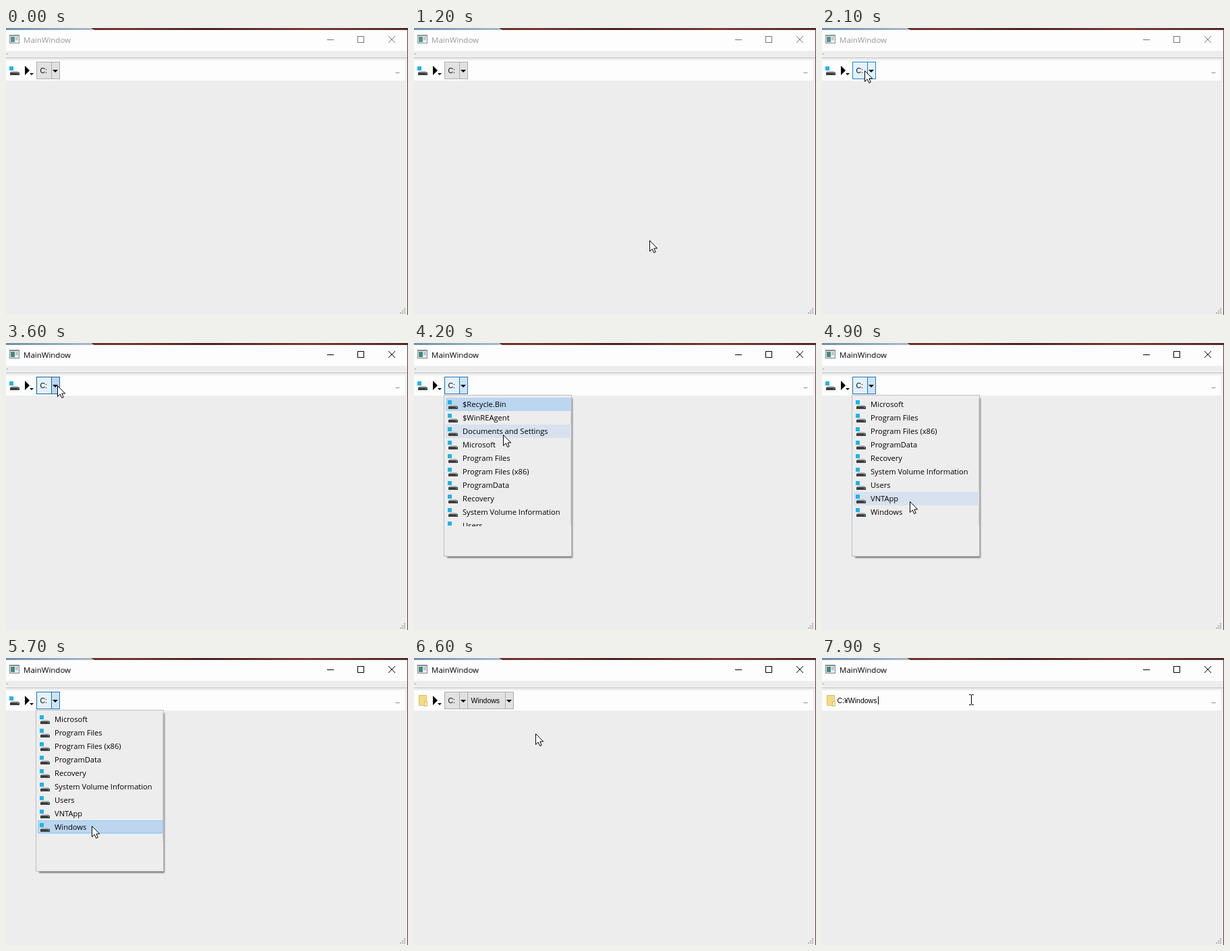
Recreate the animation shown at these times as an HTML page. Size 596 by 426 pixels, loop 8000 ms.

```html
<!DOCTYPE html>
<html lang="en">
<head>
<meta charset="utf-8">
<title>MainWindow</title>
<style>
  html, body { margin: 0; width: 100%; height: 100%; overflow: hidden; background: #ededed; }
  svg { display: block; width: 596px; height: 426px; }
  rect, .crisp { shape-rendering: crispEdges; }
  .ui { font: 11.15px "Open Sans", sans-serif; }
  .title { font-size: 11.5px; }
  .bar { font: 10.5px "Liberation Sans", Arial, sans-serif; }
</style>
</head>
<body>
<svg viewBox="0 0 596 426" xmlns="http://www.w3.org/2000/svg">
  <defs>
    <linearGradient id="sky"><stop stop-color="#6f8eaa"/><stop offset="1" stop-color="#a9bccb"/></linearGradient>
    <linearGradient id="rock">
      <stop stop-color="#4a2523"/><stop offset=".3" stop-color="#75392f"/><stop offset=".5" stop-color="#4c2424"/>
      <stop offset=".75" stop-color="#7a3c34"/><stop offset="1" stop-color="#51292a"/>
    </linearGradient>
    <filter id="soft" x="-5%" y="-5%" width="110%" height="110%"><feGaussianBlur stdDeviation="1"/></filter>
    <clipPath id="view"><rect x="47" y="81" width="187" height="191"/></clipPath>
    <g id="drive">
      <rect x="0" y="0" width="6" height="6" fill="#1db4ea"/>
      <path d="M3 7H13L15 10H1Z" fill="#b4b6b8"/>
      <rect x="1" y="9" width="14" height="4" fill="#3c3f42"/>
      <rect x="12" y="10" width="2" height="1" fill="#4fd06a"/>
    </g>
    <path id="down" d="M0 0H8L4 4Z"/>
    <g id="grip" fill="#b4b4b4"></g>
  </defs>

  <rect width="596" height="426" fill="#ededed"/>
  <rect width="596" height="3" fill="url(#rock)"/>
  <path d="M0 0H126L131 3H0Z" fill="url(#sky)"/>
  <rect y="3" width="595" height="31" fill="#fdfdfd"/>
  <rect x="595" y="3" width="1" height="423" fill="#5b3a38"/>

  <g id="appIcon">
    <rect x="5" y="10" width="15" height="13" fill="#85898d"/>
    <rect x="6" y="12" width="13" height="10" fill="#e9ecee"/>
    <rect x="7" y="13" width="6" height="8" fill="#3f8a80"/>
    <rect x="14" y="13" width="4" height="5" fill="#b9c6cf"/>
  </g>
  <g id="caption">
    <text class="ui title" x="26" y="22">MainWindow</text>
    <g fill="none" stroke="currentColor">
      <path class="crisp" d="M476 17.5H486M521.5 12.5H530.5V21.5H521.5Z"/>
      <path d="M567 12L577 22M577 12L567 22"/>
    </g>
  </g>

  <rect x="1" y="38" width="2" height="1" fill="#9a9a9a"/>
  <rect y="44" width="595" height="1" fill="#bcbcbc"/>
  <rect y="45" width="595" height="1" fill="#f8f8f8"/>
  <rect y="48" width="592" height="30" fill="#fdfdfd"/>
  <path class="crisp" d="M578 66.5h1m1 0h1m1 0h1" stroke="#222"/>

  <use id="driveIcon" href="#drive" x="5" y="57"/>
  <g id="folder">
    <rect x="7" y="55" width="11" height="15" fill="#f3dc86" stroke="#d3b458" stroke-width=".8"/>
    <rect x="15" y="64" width="4" height="7" fill="#f8e9a9" stroke="#d3b458" stroke-width=".8"/>
  </g>
  <g id="crumbs">
    <path d="M28 56L35 63L28 70Z"/>
    <use href="#down" transform="translate(35 67) scale(.75)"/>
    <g id="windowsCrumb"></g>
    <g id="rootCrumb"></g>
  </g>
  <g id="editor">
    <text class="bar" x="22.5" y="67">C:¥Windows</text>
    <rect id="caret" x="83" y="57" width="1" height="12"/>
  </g>

  <g id="menu">
    <rect x="49" y="82" width="186" height="237" fill="#555" opacity=".75" filter="url(#soft)"/>
    <rect class="crisp" x="44.5" y="77.5" width="189" height="239" fill="#ededed" stroke="#bdbdbd"/>
    <rect x="232" y="82" width="1" height="190" fill="#d2d2d2"/>
    <g clip-path="url(#view)">
      <rect id="hover" x="47" width="186" height="20" fill="#d8e1ef"/>
      <rect id="chosen" x="47" width="186" height="20" fill="#bcd6f0"/>
      <rect id="focus" x="47.5" y="241.5" width="185" height="18" fill="none" stroke="#94c9f7"/>
      <g id="items"></g>
    </g>
  </g>

  <g id="sizeGrip" fill="#b2b2b2"></g>

  <path id="arrow" d="M.5 .5V16.5L4.2 13L6.7 18.5L9.2 17.4L6.8 12H11.7Z" fill="#fff" stroke="#000"/>
  <path id="beam" class="crisp" d="M-3 -7.5H0M1 -7.5H4M.5 -7V7M-3 7.5H0M1 7.5H4" fill="none" stroke="#000"/>
</svg>

<script>
const LOOP = 8000, STEP = 100, ROW = 20, LIST_TOP = 81;
const $ = id => document.getElementById(id);
const show = (id, on) => { $(id).style.display = on ? '' : 'none'; };
const place = (id, x, y) => $(id).setAttribute('transform', `translate(${Math.round(x)} ${Math.round(y)})`);

const names = ['$Recycle.Bin', '$WinREAgent', 'Documents and Settings', 'Microsoft', 'Program Files',
  'Program Files (x86)', 'ProgramData', 'Recovery', 'System Volume Information', 'Users', 'VNTApp', 'Windows'];

// time, x, y of the pointer
const path = [
  [100, 588, 300], [900, 406, 366], [1800, 235, 214], [2100, 63, 63], [3500, 76, 63], [3700, 76, 63],
  [4200, 132, 136], [4500, 132, 128], [4700, 131, 190], [4900, 130, 235], [5400, 127, 248],
  [5900, 127, 249], [6800, 195, 73], [7100, 221, 62], [8000, 221, 62]
];

const looks = {
  idle:    { main: '#e1e1e1', drop: '#e1e1e1', edge: '#adadad' },
  hover:   { main: '#e5f1fb', drop: '#e5f1fb', edge: '#1883d0' },
  pressed: { main: '#e5f1fb', drop: '#bcd6ee', edge: '#10639f' },
  open:    { main: '#e5f1fb', drop: '#cce4f7', edge: '#1873b4' }
};

function crumb(id, x, width, label) {
  const split = x + width - 13;
  $(id).innerHTML = `
    <rect class="main" x="${x}" y="50" width="${width}" height="26"/>
    <rect class="drop" x="${split}" y="50" width="13" height="26"/>
    <path class="edge crisp" fill="none" d="M${x + .5} 50.5H${x + width - .5}V75.5H${x + .5}ZM${split + .5} 51V75"/>
    <text class="bar" x="${x + 5.5}" y="67">${label}</text>
    <use href="#down" x="${split + 2}" y="62"/>`;
  paintCrumb(id, 'idle');
}

function paintCrumb(id, state) {
  const look = looks[state], part = name => $(id).querySelector('.' + name);
  part('main').setAttribute('fill', look.main);
  part('drop').setAttribute('fill', look.drop);
  part('edge').setAttribute('stroke', look.edge);
}

function pointerAt(t) {
  const i = Math.max(1, path.findIndex(p => p[0] >= t));
  const [t0, x0, y0] = path[i - 1], [t1, x1, y1] = path[i];
  const k = Math.max(0, (t - t0) / (t1 - t0));
  return [x0 + (x1 - x0) * k, y0 + (y1 - y0) * k];
}

function rootState(t, x, y) {
  if (t >= 5800) return 'idle';
  if (t >= 3700) return 'open';
  if (t >= 3600) return 'pressed';
  return x >= 45 && x < 80 && y >= 50 && y < 76 ? 'hover' : 'idle';
}

function placeRow(id, row) {
  show(id, row >= 0);
  if (row >= 0) $(id).setAttribute('y', LIST_TOP + ROW * row);
}

function draw(t) {
  const [x, y] = pointerAt(t);
  const menuOpen = t >= 3700 && t < 5800;
  const scroll = t >= 4400 ? 3 : 0;
  const arrived = t >= 5800, editing = t >= 6900;
  const beam = t > 6000 && y < 78;

  const ink = t >= 3500 ? '#000' : '#999';
  $('caption').setAttribute('fill', ink);
  $('caption').setAttribute('color', t >= 3500 ? '#000' : '#777');
  $('appIcon').setAttribute('opacity', t >= 3500 ? 1 : .9);

  show('driveIcon', !arrived);
  show('folder', arrived);
  show('crumbs', !editing);
  show('windowsCrumb', arrived);
  paintCrumb('rootCrumb', rootState(t, x, y));

  show('editor', editing);
  show('caret', Math.floor((t - 6900) / 500) % 2 === 0);

  show('menu', menuOpen);
  const stale = t >= 4400 && t < 4600;
  placeRow('hover', stale ? -1 : Math.floor((y - LIST_TOP) / ROW));
  placeRow('chosen', t >= 5600 ? 8 : scroll ? -1 : 0);
  show('focus', t >= 5600);
  place('items', 0, -ROW * scroll);

  show('arrow', t >= 100 && !beam);
  show('beam', beam);
  place(beam ? 'beam' : 'arrow', x, y);
}

crumb('rootCrumb', 45, 35, 'C:');
crumb('windowsCrumb', 79, 69, 'Windows');
$('items').innerHTML = names.map((name, i) => {
  const top = LIST_TOP + ROW * i;
  return `<use href="#drive" x="50" y="${top + 4}"/><text class="ui" x="72" y="${top + 14}">${name}</text>`;
}).join('');
for (let row = 0; row < 3; row++)
  for (let col = 2 - row; col < 3; col++)
    $('sizeGrip').innerHTML += `<rect x="${584 + 3 * col}" y="${416 + 3 * row}" width="2" height="2"/>`;

const start = performance.now();
function tick() {
  const t = (performance.now() - start + 5) % LOOP;
  draw(Math.floor(t / STEP) * STEP);
  requestAnimationFrame(tick);
}
tick();
</script>
</body>
</html>
```
